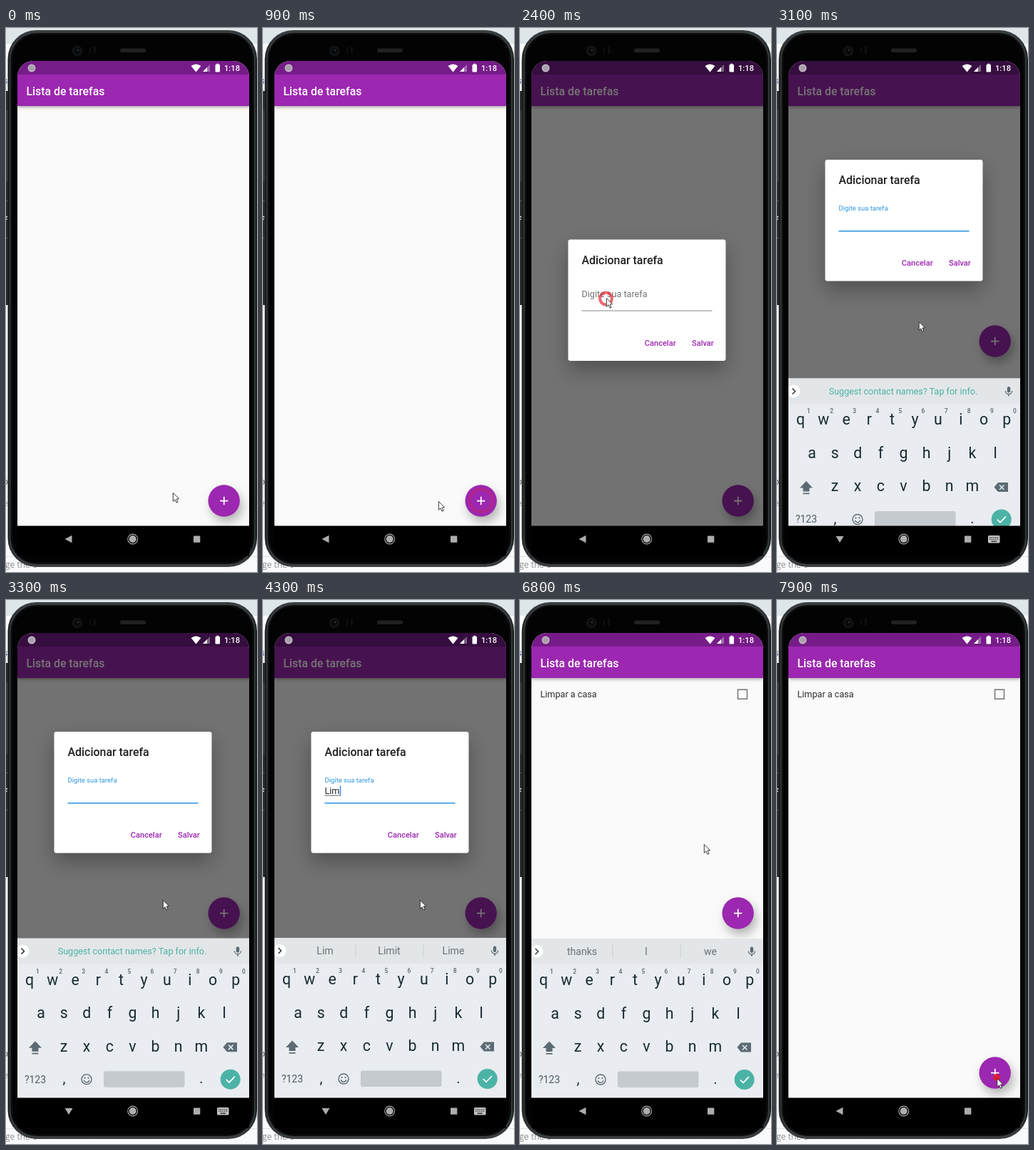
Recreate the animation shown at these times as an HTML page with a canvas. Size 352 by 760 pixels, loop 8000 ms.

```html
<!DOCTYPE html>
<html lang="pt">
<head>
<meta charset="utf-8">
<title>Lista de tarefas</title>
<style>
html, body { margin: 0; width: 100%; height: 100%; overflow: hidden; background: #fff; }
canvas { display: block; width: 352px; height: 760px; }
</style>
</head>
<body>
<canvas id="stage"></canvas>
<script>
const LOOP = 8000, W = 352, H = 760;
const PURPLE = '#9c27b0', BLUE = '#2a95e0', TEAL = '#4bb3a5', KEY = '#172b32', ICON = '#5c6b73';
const TASK = 'Limpar a casa';
const KEY_TIMES = [3800, 4200, 4300, 4400, 4500, 4600, 4800, 4900, 5000, 5100, 5200, 5300, 5400];
const CLICKS = [[460, 306, 660], [2200, 120.5, 378], [6100, 258, 341], [7880, 308, 667]];
const POINTER = [
  [0, 234, 649], [80, 234, 649], [420, 306, 660], [600, 306, 660], [880, 246, 661],
  [1800, 246, 661], [2180, 121, 377], [2750, 121, 377], [3250, 220, 419], [5700, 220, 419],
  [6050, 258, 341], [7300, 258, 341], [7800, 308.5, 668], [8000, 308.5, 668]
];
const SUGGESTIONS = [
  [3800, 'L', 'Love', 'Let'], [4200, 'Li', 'Like', 'Life'], [4300, 'Lim', 'Limit', 'Lime'],
  [4400, 'Limp', 'Limo', 'Limit'], [4600, 'Limpar', 'Limp', 'Limpid'], [4800, 'a', 'and', 'the'],
  [5000, 'few', 'lot', 'good'], [5100, 'can', 'call', 'come'], [5300, 'cash', 'case', 'cast'],
  [5400, 'casa', 'class', 'casserole'], [6500, 'thanks', 'I', 'we']
];

const canvas = document.getElementById('stage');
const ctx = canvas.getContext('2d');
const dpr = window.devicePixelRatio || 1;
canvas.width = W * dpr;
canvas.height = H * dpr;

const ramp = (t, a, b) => Math.min(1, Math.max(0, (t - a) / (b - a)));
const smooth = p => p * p * (3 - 2 * p);
const lerp = (a, b, p) => a + (b - a) * p;

function text(s, x, y, size, color, weight = 400, align = 'left') {
  ctx.font = `${weight} ${size}px Roboto, sans-serif`;
  ctx.textAlign = align;
  ctx.fillStyle = color;
  ctx.fillText(s, x, y);
}
function rect(x, y, w, h, color, r = 0) {
  ctx.fillStyle = color;
  ctx.beginPath();
  ctx.roundRect(x, y, w, h, r);
  ctx.fill();
}
function circle(x, y, r, color) {
  ctx.fillStyle = color;
  ctx.beginPath();
  ctx.arc(x, y, r, 0, 7);
  ctx.fill();
}
function ring(x, y, r, width, color) {
  ctx.strokeStyle = color;
  ctx.lineWidth = width;
  ctx.beginPath();
  ctx.arc(x, y, r, 0, 7);
  ctx.stroke();
}
function trace(points) {
  ctx.beginPath();
  for (let i = 0; i < points.length; i += 2) ctx.lineTo(points[i], points[i + 1]);
}
function poly(points, color) {
  trace(points);
  ctx.closePath();
  ctx.fillStyle = color;
  ctx.fill();
}
function line(points, color, width) {
  trace(points);
  ctx.strokeStyle = color;
  ctx.lineWidth = width;
  ctx.stroke();
}
function shadowed(color, blur, dx, dy, draw) {
  ctx.save();
  ctx.shadowColor = color;
  ctx.shadowBlur = blur * dpr;
  ctx.shadowOffsetX = dx * dpr;
  ctx.shadowOffsetY = dy * dpr;
  draw();
  ctx.restore();
}

function drawDesktop() {
  rect(0, 0, W, H, '#f9fafb');
  rect(0, 0, W, 22, '#dfe6ea');
  text('s', -4, 78, 12, '#3b4a9a');
  rect(0, 88, 5, 299, '#292a2b');
  rect(0, 115, 5, 100, '#3a3b3c');
  rect(0, 241, 5, 1, '#5a5a5a');
  rect(0, 293, 5, 1, '#5a5a5a');
  text('F', -5, 272, 13, '#eee', 700);
  text('o', -4, 638, 12, '#555');
  text('e', -4, 668, 12, '#999');
  rect(0, 738, W, 1, '#dddfe1');
  ctx.font = '12px "Open Sans", sans-serif';
  ctx.textAlign = 'left';
  ctx.fillStyle = '#8b8d8f';
  ctx.fillText('ge the c', -1, 754);
}

function drawPhone() {
  const edge = ctx.createLinearGradient(0, 3, 0, 753);
  edge.addColorStop(0, '#3c4042');
  edge.addColorStop(0.06, '#1b1e1f');
  edge.addColorStop(0.94, '#1b1e1f');
  edge.addColorStop(1, '#3c4042');
  rect(2.5, 3, 349.5, 750, edge, 40);
  rect(5, 5.5, 344.5, 745, '#3a3e40', 38);
  rect(6.5, 7, 341.5, 742, '#0b0d0e', 36.5);
  rect(9, 9.5, 336.5, 737, '#030303', 34);
  circle(100, 32, 7.5, '#111213');
  circle(100, 32, 4, '#08090a');
  circle(101, 31, 1.3, '#303336');
  rect(117, 27, 2, 9, '#0d0e0e');
  rect(123, 26, 3, 10, '#0d0e0e');
  rect(160, 28.5, 36, 5.5, '#202122', 2.5);
}

function drawApp(t, fabY) {
  rect(16, 46, 325, 650, '#fafafa');
  shadowed('rgba(0,0,0,.3)', 4, 0, 1.5, () => rect(16, 64, 325, 45, PURPLE));
  rect(16, 46, 325, 19, '#761c89');
  text('Lista de tarefas', 28.5, 93.5, 15.8, '#fff', 500);
  if (t >= 6600) {
    text(TASK, 28.5, 136, 12.64, '#2b2b2b');
    ctx.strokeStyle = '#757575';
    ctx.lineWidth = 1.5;
    ctx.strokeRect(305.5, 125.2, 13, 13);
  }
  shadowed('rgba(0,0,0,.28)', 14, 4, 8, () => circle(305.7, fabY, 22.2, PURPLE));
  rect(300, fabY - 0.8, 11.4, 1.7, '#fff');
  rect(304.9, fabY - 5.7, 1.7, 11.4, '#fff');
}

function drawStatus() {
  circle(36, 56, 5.5, '#aaa0ad');
  ring(36, 56, 4.6, 1, '#cbc3cd');
  ctx.fillStyle = '#fff';
  ctx.beginPath();
  ctx.moveTo(266.5, 61.5);
  ctx.lineTo(259.5, 53);
  ctx.quadraticCurveTo(266.5, 48, 273.5, 53);
  ctx.fill();
  poly([276, 61, 286, 61, 286, 51], 'rgba(255,255,255,.35)');
  poly([276, 61, 282, 61, 282, 55], '#fff');
  rect(293.5, 51, 6.5, 10.5, '#fff', 1);
  rect(295.3, 49.8, 3, 2, '#fff');
  text('1:18', 306, 60, 11.2, '#fff', 500);
}

function drawDialog(t, alpha) {
  if (!alpha) return;
  ctx.save();
  ctx.globalAlpha = alpha;
  rect(16, 46, 325, 650, 'rgba(0,0,0,.54)');
  ctx.translate(0, -111.5 * smooth(ramp(t, 2750, 2900)));
  shadowed('rgba(0,0,0,.3)', 28, 0, 12, () => rect(67.5, 295.5, 221, 169.5, '#fff', 3.2));
  text('Adicionar tarefa', 86.5, 329.5, 15.9, '#1f1f1f', 500);

  const lift = smooth(ramp(t, 2450, 2650));
  const focused = lift > 0.3;
  text('Digite sua tarefa', 86.5, lerp(376, 366.5, lift), lerp(12.64, 9.48, lift), focused ? BLUE : '#737373');
  rect(86.5, 394.5, 183, focused ? 1.6 : 0.9, focused ? BLUE : '#8a8a8a');

  const typed = TASK.slice(0, KEY_TIMES.filter(k => k <= t).length);
  text(typed, 86.5, 382.5, 12.64, '#212121');
  const end = 86.5 + ctx.measureText(typed).width;
  const word = ctx.measureText(typed.split(' ').pop()).width;
  if (t < 6100) rect(end - word, 384.2, word, 0.9, '#333');
  const typing = t >= 3800 && t < 5650;
  if (t >= 2700 && (typing || Math.floor((t - 3400) / 500) % 2 === 0)) {
    rect(end + 0.3, 371, 1.5, 14.5, '#4285f4');
  }

  if (t >= 6100) rect(234, 426, 45, 28, 'rgba(156,39,176,.12)', 3);
  text('Cancelar', 174.8, 443.5, 11.06, PURPLE, 500);
  text('Salvar', 241, 443.5, 11.06, PURPLE, 500);
  ctx.restore();
}

function drawSuggestions(t) {
  const current = SUGGESTIONS.filter(s => s[0] <= t).pop();
  if (!current) {
    text('Suggest contact names? Tap for info.', 177, 494.5, 12.55, TEAL, 400, 'center');
    return;
  }
  current.slice(1).forEach((word, i) => text(word, 87 + 90 * i, 495, 14.1, '#687277', 400, 'center'));
  rect(129.5, 480.5, 1, 19, '#c9cdd0');
  rect(224.5, 480.5, 1, 19, '#c9cdd0');
}

function drawKeyboard(t, offset) {
  if (offset >= 224) return;
  ctx.save();
  ctx.translate(0, offset);
  rect(16, 472, 325, 224, '#e9ecf0');
  rect(16, 472, 325, 35.5, '#e3e6e8');
  circle(23.5, 490, 9, '#fff');
  line([21.5, 486, 25.5, 490, 21.5, 494], '#333', 1.5);
  drawSuggestions(t);

  rect(322.8, 483.5, 4.4, 8.5, ICON, 2.2);
  ctx.strokeStyle = ICON;
  ctx.lineWidth = 1.3;
  ctx.beginPath();
  ctx.arc(325, 489.5, 4.6, 0, Math.PI);
  ctx.stroke();
  rect(324.3, 494, 1.4, 3, ICON);

  const upper = t >= 3600 && t < 3900;
  const rows = [['qwertyuiop', 33, 537], ['asdfghjkl', 49, 583.5], ['zxcvbnm', 81, 630]];
  for (const [letters, x, y] of rows) {
    [...(upper ? letters.toUpperCase() : letters)].forEach((c, i) =>
      text(c, x + 32.13 * i, y, 21.3, KEY, 400, 'center'));
  }
  [...'1234567890'].forEach((c, i) => text(c, 44.5 + 32.1 * i, 521, 8.4, '#57656b', 500, 'center'));

  poly([41, 615.5, 50, 625, 45.5, 625, 45.5, 630, 36.5, 630, 36.5, 625, 32, 625], upper ? TEAL : ICON);
  rect(36.5, 632, 9, 1.8, upper ? TEAL : ICON);
  poly([304.5, 624, 310, 617.5, 324, 617.5, 324, 630.5, 310, 630.5], ICON);
  line([312, 621, 318.5, 627.5], '#e9ecf0', 1.5);
  line([318.5, 621, 312, 627.5], '#e9ecf0', 1.5);

  text('?123', 41, 674, 14, '#4c5b62', 400, 'center');
  text(',', 81.5, 674.5, 20, KEY, 400, 'center');
  ring(113, 669, 7, 1.4, ICON);
  circle(110.5, 667, 1.1, ICON);
  circle(115.5, 667, 1.1, ICON);
  ctx.beginPath();
  ctx.arc(113, 669.5, 3.8, 0.2, Math.PI - 0.2);
  ctx.stroke();
  rect(137, 657.5, 113.5, 22.5, '#c5cacf', 3);
  text('.', 274, 674.5, 20, KEY, 400, 'center');
  circle(314.7, 669, 14, TEAL);
  line([308.8, 669.2, 313, 673.3, 321, 665], '#fff', 1.7);
  ctx.restore();
}

function drawNavigation(t) {
  const keyboard = t >= 2700 && t < 6700;
  const gray = '#adadad';
  rect(16, 695.5, 325, 42, '#000');
  poly(keyboard ? [82.5, 710, 93.5, 710, 88, 719] : [82.5, 714, 92.5, 708.7, 92.5, 719.3], gray);
  ring(177.7, 714, 6.9, 1.1, gray);
  circle(177.7, 714, 5, gray);
  rect(263, 709.5, 9.3, 9.3, gray, 0.6);
  if (!keyboard) return;
  rect(296, 709, 16.5, 10.5, '#c4c4c4', 1.5);
  for (let i = 0; i < 5; i++) {
    rect(298 + i * 2.7, 711, 1.4, 1.3, '#222');
    rect(298 + i * 2.7, 713.5, 1.4, 1.3, '#222');
  }
  rect(300.5, 716.5, 7.5, 1.3, '#222');
}

function drawPointer(t) {
  for (const [start, x, y] of CLICKS) {
    const age = t - start;
    if (age < 0 || age >= 600) continue;
    ctx.save();
    ctx.globalAlpha = 1 - age / 600;
    ring(x, y, 2.2 + age * 0.031, 4, '#e01e2b');
    ctx.restore();
  }
  const i = Math.max(1, POINTER.findIndex(k => k[0] > t));
  const [t0, x0, y0] = POINTER[i - 1], [t1, x1, y1] = POINTER[i];
  const p = smooth(ramp(t, t0, t1));
  ctx.save();
  ctx.translate(lerp(x0, x1, p), lerp(y0, y1, p));
  poly([0.3, 0.5, 0.3, 12.3, 3, 9.8, 5, 14.2, 7, 13.3, 5.1, 9, 8.6, 8.8], '#fff');
  ctx.strokeStyle = '#222';
  ctx.lineWidth = 0.9;
  ctx.stroke();
  ctx.restore();
}

function render(t) {
  const shown = 1 - (1 - ramp(t, 2700, 3400)) ** 3;
  const hidden = ramp(t, 6790, 6950) ** 2;
  const fabLift = smooth(ramp(t, 2750, 2900)) - smooth(ramp(t, 6840, 6940));
  const dialogAlpha = smooth(ramp(t, 1000, 1250)) * (1 - smooth(ramp(t, 6600, 6780)));

  ctx.setTransform(dpr, 0, 0, dpr, 0, 0);
  drawDesktop();
  drawPhone();
  ctx.save();
  ctx.beginPath();
  ctx.roundRect(16, 46, 325, 650, [22, 22, 0, 0]);
  ctx.clip();
  drawApp(t, 660.5 - 223 * fabLift);
  drawDialog(t, dialogAlpha);
  drawStatus();
  drawKeyboard(t, 224 * (1 - shown + hidden));
  ctx.restore();
  drawNavigation(t);
  drawPointer(t);
}

const began = performance.now();
function tick() {
  render((performance.now() - began) % LOOP);
  requestAnimationFrame(tick);
}
tick();
</script>
</body>
</html>
```
